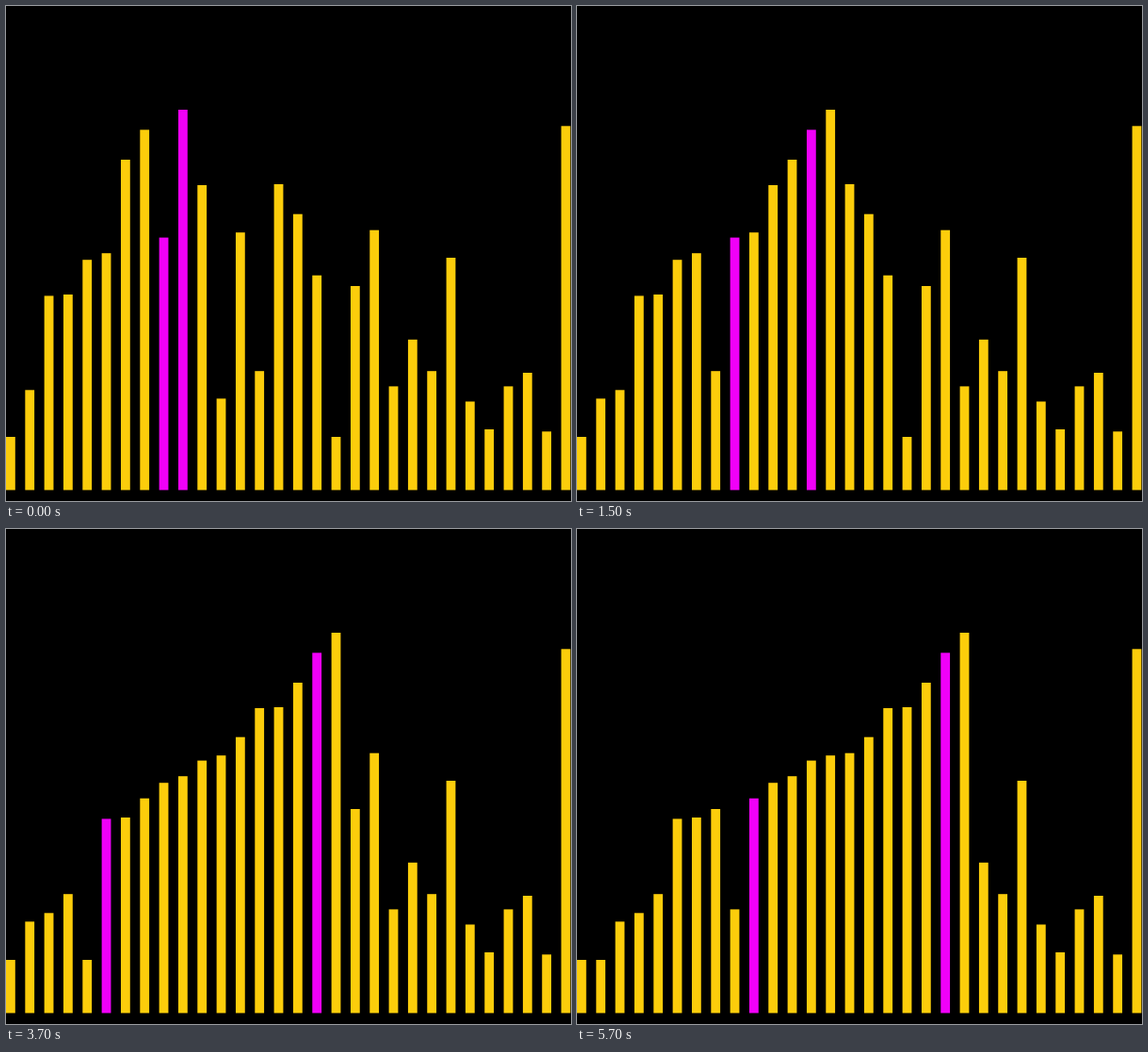
These frames come from a looping animation (600x525 px, 5.8 s). An HTML page:

```html
<!DOCTYPE html>
<html lang="en">
<head>
<meta charset="utf-8">
<title>Insertion sort</title>
<style>
  html, body { margin: 0; width: 100%; height: 100%; overflow: hidden; background: #000; }
  svg { display: block; width: 600px; height: 525px; }
</style>
</head>
<body>
<svg id="stage" viewBox="0 0 600 525" xmlns="http://www.w3.org/2000/svg"></svg>
<script>
const LOOP_MS = 5800, FRAME_MS = 100, SWAP_MS = 62, LEAD = 0.85;
const PITCH = 20.33, BAR_WIDTH = 9.8, BASE = 513.4;
const YELLOW = '#fccd0b', MAGENTA = '#f000f8';
const FIRST_KEY = 9, LAST_KEY = 20;

// Top edge of every bar before the first visible swap.
const startTops = [
  457, 407.3, 307.4, 306, 269.2, 262.2, 163, 131.3, 110, 245.6,
  190, 416.4, 240.2, 387.2, 189, 220.7, 285.7, 457, 297, 237.7,
  403.4, 353.8, 387.2, 267, 419.5, 449, 403.4, 389, 451.3, 127.3
];

// One state per swap of the insertion sort.
function sortStates() {
  const tops = startTops.slice(), states = [];
  for (let i = FIRST_KEY; i <= LAST_KEY; i++) {
    for (let j = i - 1; j >= 0 && tops[j] < tops[j + 1]; j--) {
      [tops[j], tops[j + 1]] = [tops[j + 1], tops[j]];
      states.push({ tops: tops.slice(), marks: [j + 1, i - 1] });
    }
  }
  return states;
}

const states = sortStates();
const stage = document.getElementById('stage');
const bars = startTops.map((_, i) => {
  const bar = document.createElementNS(stage.namespaceURI, 'rect');
  bar.setAttribute('x', (i * PITCH).toFixed(2));
  bar.setAttribute('width', BAR_WIDTH);
  return stage.appendChild(bar);
});

function draw(ms) {
  const frame = Math.floor((ms % LOOP_MS) / FRAME_MS);
  const swap = Math.floor(frame * FRAME_MS / SWAP_MS + LEAD);
  const { tops, marks } = states[Math.min(swap, states.length - 1)];
  bars.forEach((bar, i) => {
    bar.setAttribute('y', tops[i]);
    bar.setAttribute('height', BASE - tops[i]);
    bar.setAttribute('fill', marks.includes(i) ? MAGENTA : YELLOW);
  });
}

const start = performance.now();
function tick() {
  draw(performance.now() - start);
  requestAnimationFrame(tick);
}
tick();
</script>
</body>
</html>
```
